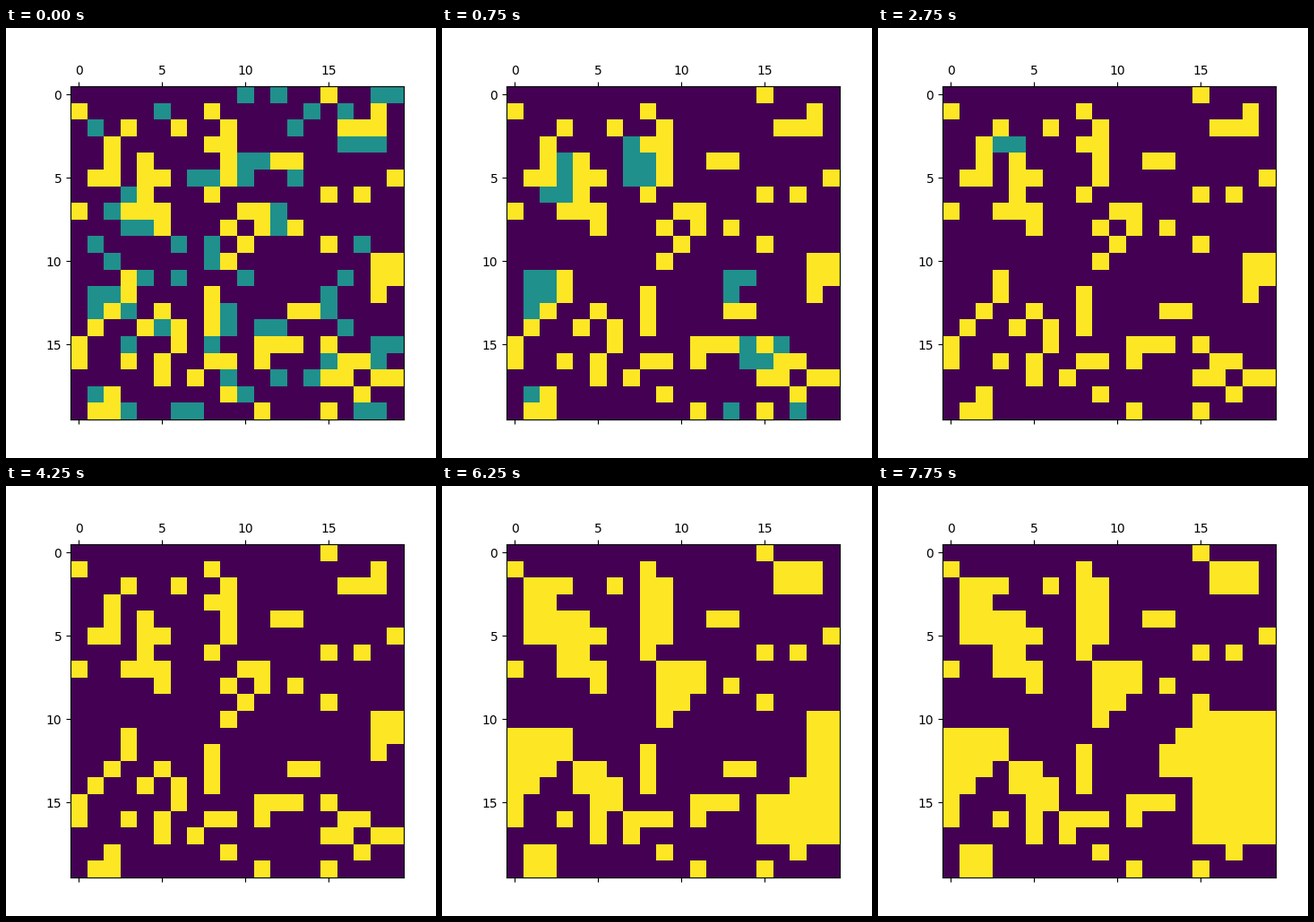
A matplotlib script for the animation above (8000 ms loop, 480x480 px).

```python
import numpy as np
import matplotlib.pyplot as plt
from matplotlib.animation import FuncAnimation

SIZE = 20
STEPS = 32
SWEEP = 5  # steps spent on each direction

# Columns occupied in each row.
WALLS = [
    (15,), (0, 8, 18), (3, 6, 9, 16, 17, 18), (2, 8, 9), (2, 4, 9, 12, 13),
    (1, 2, 4, 5, 9, 19), (4, 8, 15, 17), (0, 3, 4, 5, 10, 11),
    (5, 9, 11, 13), (10, 15), (9, 18, 19), (3, 18, 19), (3, 8, 18),
    (2, 5, 8, 13, 14), (1, 4, 6, 8), (0, 6, 11, 12, 13, 15),
    (0, 3, 5, 8, 9, 11, 16, 17), (5, 7, 15, 16, 18, 19), (2, 9, 17),
    (1, 2, 11, 15),
]
ERRORS = [
    (10, 12, 18, 19), (5, 14, 16), (1, 13), (16, 17, 18), (10, 11),
    (7, 8, 10, 13), (3,), (2, 12), (3, 4, 12), (1, 6, 8, 17), (2, 8),
    (4, 6, 10, 16), (1, 2, 15), (1, 3, 9, 15), (5, 9, 11, 12, 16),
    (3, 8, 18, 19), (15, 18), (9, 12, 14), (1, 10), (3, 6, 7, 17, 18),
]
# Vertical and horizontal neighbour offsets: SE, SW, NE, NW.
DIRECTIONS = [(1, 1), (1, -1), (-1, 1), (-1, -1)]


def to_grid(rows):
    grid = np.zeros((SIZE, SIZE), bool)
    for row, cols in enumerate(rows):
        grid[row, list(cols)] = True
    return grid


def neighbours(grid, direction):
    dy, dx = direction
    return np.roll(grid, -dy, axis=0), np.roll(grid, -dx, axis=1)


def sweep(errors, walls, direction):
    """Flip cells that differ from both neighbours; walls never object."""
    vert, horiz = neighbours(errors, direction)
    wall_v, wall_h = neighbours(walls, direction)
    differs = ((errors != vert) | wall_v) & ((errors != horiz) | wall_h)
    flip = differs & ~(wall_v & wall_h)
    return (errors ^ flip) & ~walls


def grow(walls):
    vert, horiz = neighbours(walls, DIRECTIONS[0])
    return walls | (vert & horiz)


def simulate():
    walls, errors = to_grid(WALLS), to_grid(ERRORS)
    history = [errors + 2 * walls]
    for step in range(STEPS - 1):
        phase = step // SWEEP
        if phase < len(DIRECTIONS):
            errors = sweep(errors, walls, DIRECTIONS[phase])
        else:
            walls = grow(walls)
        history.append(errors + 2 * walls)
    return history


states = simulate()
fig = plt.figure(figsize=(4.8, 4.8), dpi=100)
ax = fig.add_axes([0.15, 0.09, 0.775, 0.775])
image = ax.matshow(states[0], cmap="viridis", vmin=0, vmax=2)


def update(step):
    image.set_data(states[step])
    return [image]


anim = FuncAnimation(fig, update, frames=STEPS, interval=250,
                     repeat=True, repeat_delay=0)
plt.show()
```
